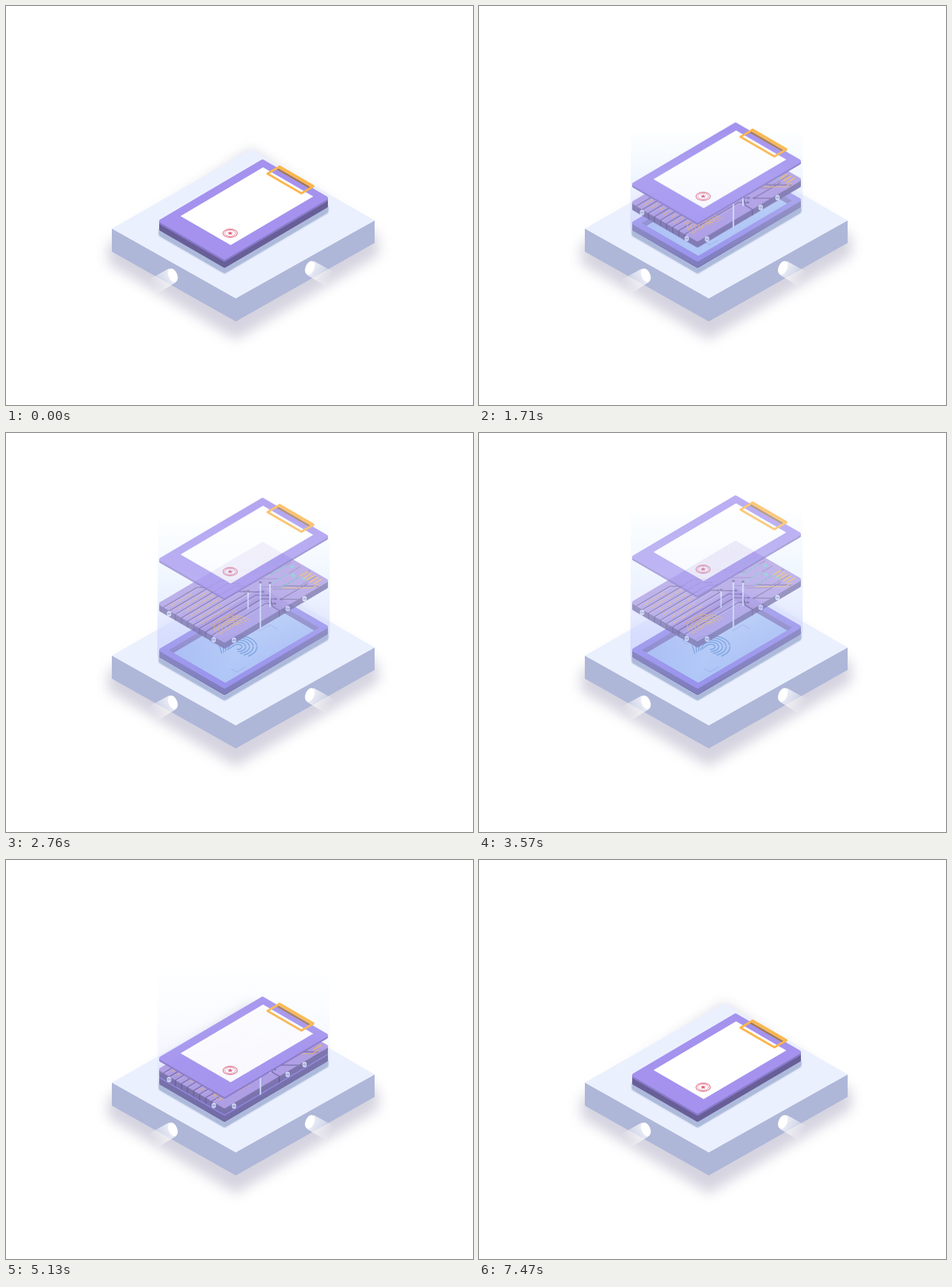
Animation of 750 by 640 pixels, one loop 7500 ms. Source, as an HTML page with a canvas:

```html
<!DOCTYPE html>
<html lang="en">
<head>
<meta charset="utf-8">
<title>Layered clipboard</title>
<style>
html, body { margin: 0; width: 750px; height: 640px; overflow: hidden; background: #fff; }
canvas { display: block; }
</style>
</head>
<body>
<canvas id="stage" width="750" height="640"></canvas>
<script>
const W = 750, H = 640, LOOP = 7500;
const ctx = document.getElementById('stage').getContext('2d');

// Tablet plane: u runs up-right, v down-right, both 0..1; z is pixels downwards.
const P = (u, v, z = 0) => [243 + 169 * u + 108 * v, 345 - 99.5 * u + 62.5 * v + z];
const iso = pts => pts.map(([u, v]) => P(u, v));
const quad = (u0, v0, u1, v1, z = 0) => [P(u0, v0, z), P(u1, v0, z), P(u1, v1, z), P(u0, v1, z)];

let seed = 7;
const rand = (lo, hi) => {
  seed = seed * 16807 % 2147483647;
  return lo + (hi - lo) * seed / 2147483647;
};

function sprite(draw) {
  const c = document.createElement('canvas');
  c.width = W;
  c.height = H;
  const g = c.getContext('2d');
  g.lineJoin = g.lineCap = 'round';
  draw(g);
  return c;
}
function poly(g, pts, fill) {
  g.beginPath();
  pts.forEach(p => g.lineTo(...p));
  g.closePath();
  g.fillStyle = fill;
  g.fill();
}
function stroke(g, color, width) {
  g.strokeStyle = color;
  g.lineWidth = width;
  g.stroke();
}
function line(g, pts, color, width = 1) {
  g.beginPath();
  pts.forEach(p => g.lineTo(...p));
  stroke(g, color, width);
}
function ring(g, [x, y], r, color, width, from = 0, to = 2 * Math.PI) {
  g.beginPath();
  g.ellipse(x, y, r, r * .58, 0, from, to);
  stroke(g, color, width);
}
function dot(g, [x, y], rx, ry, fill, turn = 0) {
  g.beginPath();
  g.ellipse(x, y, rx, ry, turn, 0, 2 * Math.PI);
  g.fillStyle = fill;
  g.fill();
}
function fade(g, x0, y0, x1, y1, ...colors) {
  const grad = g.createLinearGradient(x0, y0, x1, y1);
  colors.forEach((c, i) => grad.addColorStop(i / (colors.length - 1), c));
  return grad;
}

function plate(g, z, fill) {
  const c = quad(0, 0, 1, 1, z);
  g.beginPath();
  g.moveTo(...P(.5, 0, z));
  [1, 2, 3, 0].forEach(i => g.arcTo(...c[i], ...c[(i + 1) % 4], 3));
  g.closePath();
  g.fillStyle = fill;
  g.fill();
}
function slab(g, z, h, top, side) {
  for (let k = h; k > 0; k--) plate(g, z + k, side);
  plate(g, z, top);
}

function lamp(g, x, y, dir) {
  const cone = [[-6, -11], [-41, 8], [-27, 31], [5, 11]].map(([dx, dy]) => [x + dx * dir, y + dy]);
  poly(g, cone, fade(g, x, y, x - 34 * dir, y + 19, 'rgba(255,255,255,.8)', 'rgba(255,255,255,.5)', 'rgba(255,255,255,0)'));
  dot(g, [x, y], 7, 11.5, '#fff', -.4 * dir);
}

const base = sprite(g => {
  const left = [170, 357], back = [394, 230], right = [592, 344], front = [369, 469];
  const down = ([x, y], dy, out = 0) => [x + out, y + dy];
  g.fillStyle = '#fff';
  g.fillRect(0, 0, W, H);
  g.filter = 'blur(10px)';
  poly(g, [down(left, 26, -6), back, down(right, 26, 6), down(right, 56, 6), down(front, 66), down(left, 56, -6)],
    'rgba(203,201,216,.8)');
  g.filter = 'none';
  poly(g, [left, front, right, down(right, 36), down(front, 37), down(left, 37)], '#aeb7d8');
  poly(g, [left, back, right, front], '#ebf0fe');
  lamp(g, 268, 432, 1);
  lamp(g, 488, 420, -1);
  g.filter = 'blur(1.2px)';
  slab(g, 14, 8, '#aebbdc', '#aebbdc');
  g.filter = 'none';

  slab(g, 3, 10, '#8f80e2', '#685f97');
  const hole = z => quad(.053, .087, .943, .928, z);
  poly(g, hole(3), '#766cab');
  g.save();
  g.clip();
  poly(g, hole(12), fade(g, 300, 310, 440, 400, '#a4c0ee', '#b3d2f2', '#a7c4f0'));
  for (const [u, v, du, dv] of [[.3, .3, .08, .08], [.72, .55, -.1, .1], [.18, .9, .08, -.08]])
    line(g, iso([[u + du, v], [u, v], [u, v + dv]]), '#9cb6df', 1.5);
  g.restore();
});

const print = sprite(g => {
  for (let r = 7; r < 34; r += 6) {
    ring(g, [372, 343], r, '#5b93cf', 1.8, -2.9 + r * .01, -.15);
    ring(g, [372, 343], r, '#5b93cf', 1.8, 0, 1.9 - r * .03);
    line(g, [[372 - r * .95, 341], [362 - r * .5, 344 + r * .3]], '#5b93cf', 1.6);
  }
});

const board = sprite(g => {
  const dark = '#75679f', gold = '#f0b457', mint = '#67d3cb';
  slab(g, 0, 10, '#ae9ae1', '#776da5');

  for (let v = .27; v < .85; v += .09) line(g, [P(0, v), P(0, v, 9)], '#5f5689', 1.4);
  line(g, [P(.52, 1), P(.52, 1, 9)], '#5f5689', 1.8);
  for (const [u, v] of [[0, .175], [0, .84], [.09, 1], [.6, 1], [.76, 1]]) {
    dot(g, P(u, v, 5), 3.6, 4.2, '#d8e1f8');
    ring(g, P(u, v, 5), 2.1, '#8188b9', 1);
  }

  plate(g, 0, '#ae9ae1');
  g.save();
  g.clip();

  // Channels from the front left edge, each ending in a short bend.
  for (let v = .09; v < .85; v += .09) {
    const end = rand(.32, .55), bend = rand(.03, .07);
    line(g, iso([[0, v], [end, v], [end + bend, v + bend * 1.6]]), dark, 1.6);
    line(g, iso([[0, v + .02], [end, v + .02]]), '#c6b7ee', .8);
    dot(g, P(end + bend, v + bend * 1.6), 2.2, 1.6, dark);
    g.setLineDash([7, 3, 2, 3]);
    line(g, iso([[rand(.03, .1), v + .045], [rand(.2, .4), v + .045]]), gold, 1.2);
    g.setLineDash([]);
  }

  // Blocks on the right.
  line(g, iso([[.58, .77], [.52, .9], [.52, 1]]), dark, 1.8);
  for (const [u, v] of [[.74, .72], [.62, .87]]) {
    line(g, iso([[u, v], [u + .16, v + .26]]), dark, 1.5);
    line(g, iso([[u, v], [u + .25, v]]), dark, 1.4);
    dot(g, P(u, v), 2.2, 1.6, dark);
  }
  for (let v = .2; v < .7; v += .12) {
    const u = rand(.62, .7);
    line(g, iso([[u, v], [u + .1, v + .16], [.97, v + .16]]), '#8b7bb6', 1.2);
    g.setLineDash([5, 2]);
    line(g, iso([[u + .06, v + .04], [u + .24, v + .04]]), mint, 1.2);
    g.setLineDash([]);
    dot(g, P(rand(.84, .95), v + .1), 3, 2, mint);
  }
  line(g, iso([[.72, .74], [.86, .96], [.92, .96]]), gold, 1.3);
  for (let v = .72; v < .96; v += .05) line(g, iso([[.9, v], [.97, v]]), gold, 2);
  for (let r = 8; r < 36; r += 6) ring(g, P(.17, .876), r, gold, 1, 2.6, 5.6);
  g.restore();

  for (const [u, v, drop] of [[.53, .52, 28], [.66, .5, 74], [.7, .58, 38]]) {
    line(g, [P(u, v), P(u, v, drop)], '#d5e3fb', 2.2);
    dot(g, P(u, v), 2.5, 2, dark);
  }
});

const lid = sprite(g => {
  slab(g, 0, 3, '#a492ee', '#8879c8');
  poly(g, quad(.15, .11, .935, .856), '#fff');

  const clip = quad(.904, .224, 1.018, .728);
  line(g, [P(.99, .24), P(.99, .72)], '#a57a50', 3);
  line(g, [...clip, clip[0]], '#fbb64c', 3.4);
  line(g, [P(1.015, .23), P(1.015, .722)], '#fbb64c', 5);

  const centre = [360, 364.5];
  ring(g, centre, 11.4, '#e8899c', 1.6);
  ring(g, centre, 8.6, '#e8899c', 1);
  const star = [];
  for (let i = 0; i < 10; i++) {
    const a = i * Math.PI / 5 - Math.PI / 2, r = i % 2 ? 2.1 : 4.9;
    star.push([centre[0] + r * Math.cos(a), centre[1] + r * .68 * Math.sin(a)]);
  }
  poly(g, star, '#e2627f');
});

const linear = x => x;
const wave = x => (1 - Math.cos(Math.PI * x)) / 2;
const bezier = (s, a, b) => 3 * s * (1 - s) * ((1 - s) * a + s * b) + s ** 3;
function settle(x) {
  let lo = 0, hi = 1;
  for (let i = 0; i < 20; i++) {
    const mid = (lo + hi) / 2;
    if (bezier(mid, .25, .25) < x) lo = mid; else hi = mid;
  }
  return bezier(lo, .1, 1);
}
const ramp = (t, a, b) => Math.min(1, Math.max(0, (t - a) / (b - a)));
// 0 to 1 between a and b, back to 0 between c and d.
const pulse = (t, a, b, c, d, up = linear, down = linear) => up(ramp(t, a, b)) - down(ramp(t, c, d));

function beam(top, alpha) {
  ctx.globalAlpha = alpha;
  poly(ctx, [[244, top], [519.5, top], P(1, 1, 13), P(0, 1, 12), P(0, 0, 13)],
    fade(ctx, 0, top, 0, 419, 'rgba(225,245,255,.1)', 'rgba(218,232,255,.5)', 'rgba(190,198,255,.55)', 'rgba(165,175,255,.45)'));
}
function put(image, alpha, lift = 0) {
  ctx.globalAlpha = alpha;
  ctx.drawImage(image, 0, -lift);
}

function draw(t) {
  const lidLift = 146 * pulse(t, 700, 3000, 4515, 5715, wave, settle);
  const boardLift = 73 * pulse(t, 700, 3000, 4422, 5622, wave, settle);
  const glow = pulse(t, 800, 1650, 4700, 5430);
  const top = 260 - 132 * pulse(t, 750, 3000, 4500, 6200);
  const clear = pulse(t, 2150, 3000, 4500, 5200);

  put(base, 1);
  put(print, pulse(t, 1500, 2310, 4600, 5200));
  beam(top, glow * .6);
  put(board, pulse(t, 800, 1050, 5300, 5450) * (.96 - .16 * clear), boardLift);
  put(lid, 1 - .26 * clear, lidLift);
  beam(top, glow * .3);
}

const start = performance.now();
function tick() {
  draw((performance.now() - start) % LOOP);
  requestAnimationFrame(tick);
}
tick();
</script>
</body>
</html>
```
